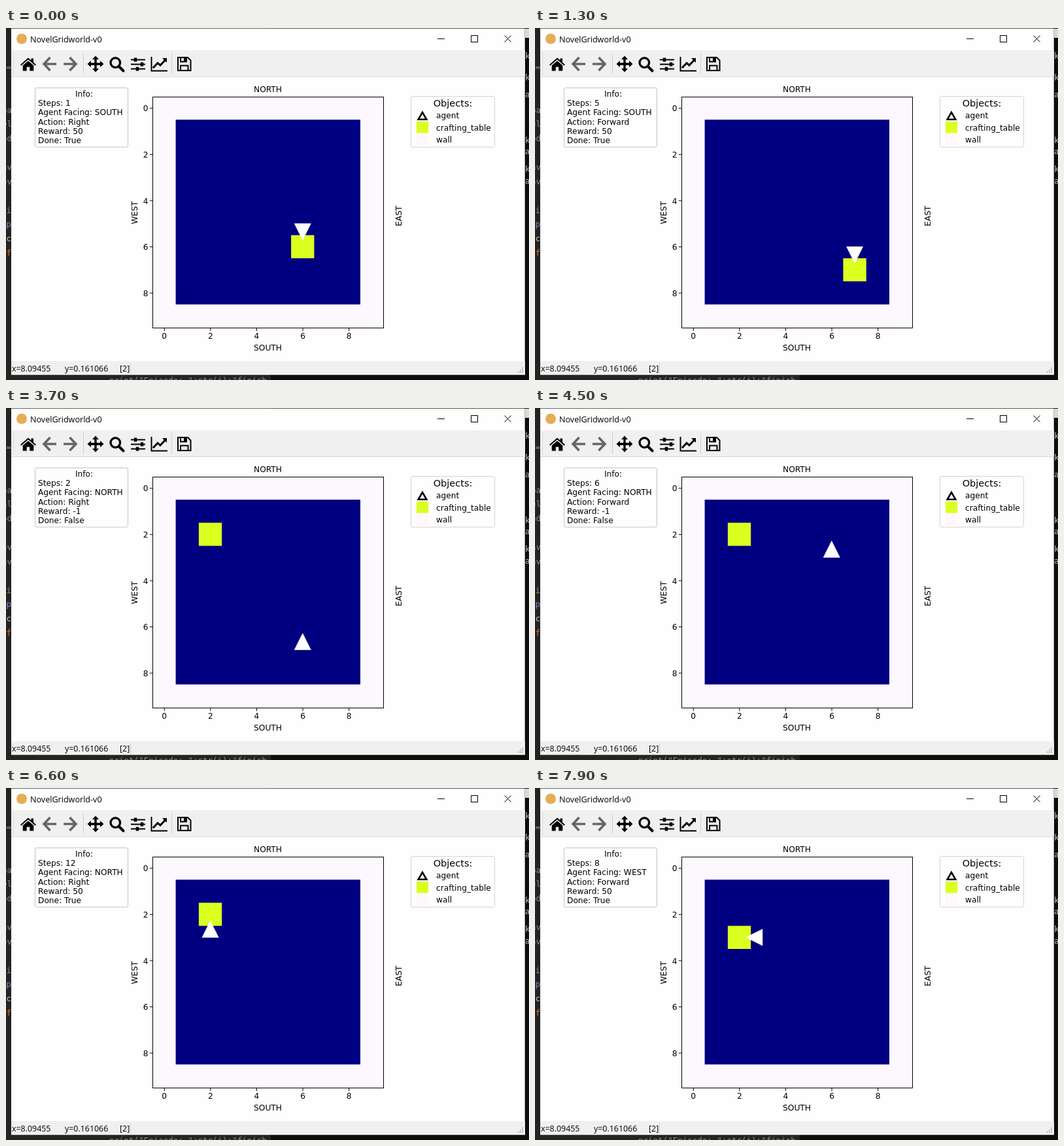
Write an HTML page that moves like this. It is 800 px wide and 538 px high and loops after 8000 ms.

```html
<!DOCTYPE html>
<html lang="en">
<head>
<meta charset="utf-8">
<title>NovelGridworld-v0</title>
<style>
  html, body { margin: 0; width: 100%; height: 100%; overflow: hidden; background: #0e0e0e; }
  svg { display: block; width: 800px; height: 538px; }
  text { white-space: pre; }
  .plot text { font: 12.2px "DejaVu Sans", sans-serif; }
  .plot .heading { font-size: 14.5px; }
  .ui { font: 12.6px "Open Sans", "Noto Sans", sans-serif; }
  .status { font-size: 12.4px; }
  .code text { font: 12.5px "DejaVu Sans Mono", monospace; }
  .mid { text-anchor: middle; }
  .end { text-anchor: end; }
  .crisp { shape-rendering: crispEdges; }
  .line { fill: none; stroke: #000; }
</style>
</head>
<body>
<svg viewBox="0 0 800 538">
  <!-- desktop behind the window -->
  <rect width="800" height="538" fill="#0e0e0e"/>
  <rect width="405" height="538" fill="#232323"/>
  <rect x="794" y="1" width="6" height="14" fill="#d8d8d8"/>
  <g class="code" id="code"></g>

  <!-- window -->
  <rect x="8" y=".7" width="785.7" height="529.5" fill="#fefefe"/>
  <g class="crisp">
    <rect x="8" y="34" width="786" height="40" fill="#f0f0f0"/>
    <rect x="8" y="74" width="786" height="1" fill="#dadada"/>
    <rect x="8" y="509" width="786" height="21" fill="#f0f0f0"/>
    <path d="M118.5 38V70M253.5 38V70M190.5 513V528" stroke="#cfcfcf"/>
  </g>
  <circle cx="24" cy="16.5" r="8" fill="#e5ad55"/>
  <text class="ui" x="37" y="21.7">NovelGridworld-v0</text>
  <path class="line crisp" d="M660 16.5H671M711.5 11.5H721.5V21.5H711.5Z"/>
  <path class="line" d="M762.5 11.5L772.5 21.5M772.5 11.5L762.5 21.5"/>
  <path d="M11.5 37V73" stroke="#b4b4b4" stroke-dasharray="1 2"/>

  <!-- toolbar icons -->
  <path d="M22 56L34 45.5L38.5 49.4V46.5H42V52.5L46 56L44.7 57.4L34 48.3L23.3 57.4Z"/>
  <path d="M25.7 57.3L34 50.2L42.3 57.3V65.5H36.3V59.5H31.7V65.5H25.7Z"/>
  <g fill="none" stroke="#666" stroke-width="3.6">
    <path d="M67.5 45L58 55L67.5 65M59 55H77"/>
    <path d="M97.5 45L107 55L97.5 65M106 55H88"/>
  </g>
  <path d="M137 42.5L142 48H138.7V53.3H144V50L149.5 55L144 60V56.7H138.7V62H142L137 67.5L132 62H135.3V56.7H130V60L124.5 55L130 50V53.3H135.3V48H132Z"/>
  <circle class="line" cx="167.3" cy="53" r="7.3" stroke-width="3.3"/>
  <path class="line" d="M172.5 58.5L179.5 65.5" stroke-width="4" stroke-linecap="round"/>
  <g class="line" stroke-width="2">
    <path d="M191 48.5H213M191 55.5H213M191 62.5H213"/>
    <path d="M198 45.5V51.5M208 52.5V58.5M201 59.5V65.5" stroke-width="4.5"/>
  </g>
  <path class="line" d="M222.5 44V65.5H247" stroke-width="2"/>
  <path class="line" d="M225 61L232 53.5L236 57L244 48.5" stroke-width="3"/>
  <path d="M239 46H246V53Z"/>
  <g class="line" stroke-width="2">
    <path d="M263 45H278L282.5 49.5V65H263Z"/>
    <path d="M267 65V57.5H278.5V65M267 45V51.5H276V45"/>
  </g>
  <path d="M272 45H276V51.5H272Z"/>

  <!-- status bar -->
  <g class="ui status">
    <text x="9" y="524.5">x=8.09455</text>
    <text x="90" y="524.5">y=0.161066</text>
    <text x="174" y="524.5">[2]</text>
  </g>
  <path class="crisp" fill="#b8b8b8" d="M789 519h2v2h-2zM786 522h2v2h-2zM789 522h2v2h-2zM783 525h2v2h-2zM786 525h2v2h-2zM789 525h2v2h-2z"/>

  <!-- figure -->
  <g class="plot">
    <rect x="224.5" y="105.5" width="353" height="353" fill="#fdf8fd"/>
    <rect x="259.6" y="140.1" width="282.4" height="282.4" fill="#000080"/>
    <rect id="table" width="35.3" height="35.3" fill="#dbff1f"/>
    <path id="agent" d="M-12.5 0H12.5L0 -25Z" fill="#fff" stroke="#fff" stroke-width=".7"/>
    <rect class="line" x="224.5" y="105.5" width="353" height="353"/>
    <g id="ticks"></g>
    <text class="mid" x="400.5" y="98">NORTH</text>
    <text class="mid" x="400.5" y="493">SOUTH</text>
    <text class="mid" transform="translate(201 282.3)rotate(-90)">WEST</text>
    <text class="mid" transform="translate(604.7 287.3)rotate(-90)">EAST</text>

    <rect x="44.5" y="91.5" width="142" height="90.5" rx="2.5" fill="#fefefe" stroke="#c4c4c4"/>
    <text class="mid" x="119.5" y="105">Info:</text>
    <g id="info"></g>

    <rect x="619.5" y="104.5" width="128" height="77.5" rx="2.5" fill="#fefefe" stroke="#d2d2d2"/>
    <text class="heading mid" x="683.5" y="120">Objects:</text>
    <path d="M637 128.8L643.3 139.8H630.7Z" fill="#fff" stroke="#000" stroke-width="2.6"/>
    <rect x="628" y="143" width="18" height="17.5" fill="#dbff1f"/>
    <rect x="628" y="161" width="18" height="18" fill="#fdf8fd"/>
    <text x="658" y="138">agent</text>
    <text x="658" y="156.5">crafting_table</text>
    <text x="658" y="174.5">wall</text>
  </g>
</svg>
<script>
const LOOP = 8000, CELL = 35.3, LEFT = 224.3, TOP = 104.8;
const FACING = ['NORTH', 'EAST', 'SOUTH', 'WEST'];
const MOVE = [[0, -1], [1, 0], [0, 1], [-1, 0]];
const ACTION = { F: 'Forward', L: 'Left', R: 'Right' };
const $ = id => document.getElementById(id);

function add(parent, tag, attrs, text = '') {
  const el = document.createElementNS('http://www.w3.org/2000/svg', tag);
  for (const key in attrs) el.setAttribute(key, attrs[key]);
  el.textContent = text;
  parent.append(el);
  return el;
}

// reset: time of the new board, first: time of step 1, gap: ms per step
const episodes = [
  { reset: -90, first: 0, gap: 170, pos: [6, 5], dir: 1, table: [6, 6], plan: 'R' },
  { reset: 200, first: 290, gap: 170, pos: [6, 3], dir: 1, table: [7, 7], plan: 'FRFFF' },
  { reset: 2150, first: 2240, gap: 170, pos: [4, 2], dir: 1, table: [6, 2], plan: 'F' },
  { reset: 3420, first: 3515, gap: 175, pos: [6, 7], dir: 2, table: [2, 2], plan: 'RRFFFFLFFFFR' },
  { reset: 6620, first: 6700, gap: 170, pos: [4, 8], dir: 1, table: [2, 3], plan: 'LFFFFFLF' }
];

function play({ reset, first, gap, pos: [x, y], dir, table, plan }) {
  const states = [{ at: reset, step: 0, x, y, dir, table, action: 'Forward', reward: 0, done: 'False' }];
  [...plan].forEach((key, i) => {
    if (key === 'F') {
      x += MOVE[dir][0];
      y += MOVE[dir][1];
    } else {
      dir = (dir + (key === 'R' ? 1 : 3)) % 4;
    }
    const won = i === plan.length - 1;
    states.push({
      at: first + i * gap, step: i + 1, x, y, dir, table,
      action: ACTION[key], reward: won ? 50 : -1, done: won ? 'True' : 'False'
    });
  });
  return states;
}
const timeline = episodes.flatMap(play);

for (let n = 0; n < 10; n += 2) {
  const x = LEFT + (n + .5) * CELL + .3, y = TOP + (n + .5) * CELL + .3;
  add($('ticks'), 'path', { class: 'line', d: `M${x} 459v4.2M224 ${y}h-4.2` });
  add($('ticks'), 'text', { class: 'mid', x, y: 475 }, n);
  add($('ticks'), 'text', { class: 'end', x: 217.5, y: y + 4.6 }, n);
}

// slivers of the editor and the terminal behind the window
const editor = [
  ['=', 64], ['pa', 130], ['el', 151], ['od', 173], ['nv', 217], ['nv', 239],
  ['i', 283], ['p', 304, '#8888c6'], ['c', 326, '#c8c8c8'], ['f', 348, '#cc7832']
];
const terminal = [['ka', 47], ['k', 80], ['a', 106], ['ka', 176], ['ar', 193], ['ka', 220], ['ar', 238]];
for (const [text, y, fill = '#8c8c8c'] of editor)
  add($('code'), 'text', { x: text.length > 1 ? -6 : .5, y, fill }, text);
for (const [text, y] of terminal)
  add($('code'), 'text', { x: 794, y, fill: '#bbb' }, text);
add($('code'), 'text', { x: 158, y: 543, fill: '#8c8c8c' }, 'print("Episode: "+str(i)+"finish');

const lines = [119, 133, 147.5, 161.5, 175.5].map(y => add($('info'), 'text', { x: 49, y }));

let shown;
function draw(now) {
  const t = now % LOOP;
  const s = timeline.findLast(state => state.at <= t);
  if (s !== shown) {
    shown = s;
    [`Steps: ${s.step}`, `Agent Facing: ${FACING[s.dir]}`, `Action: ${s.action}`,
      `Reward: ${s.reward}`, `Done: ${s.done}`].forEach((text, i) => lines[i].textContent = text);
    const px = LEFT + (s.x + .5) * CELL, py = TOP + (s.y + .5) * CELL;
    $('agent').setAttribute('transform', `translate(${px} ${py})rotate(${s.dir * 90})`);
    $('table').setAttribute('x', LEFT + s.table[0] * CELL);
    $('table').setAttribute('y', TOP + s.table[1] * CELL);
  }
  requestAnimationFrame(() => draw(performance.now()));
}
draw(performance.now());
</script>
</body>
</html>
```
